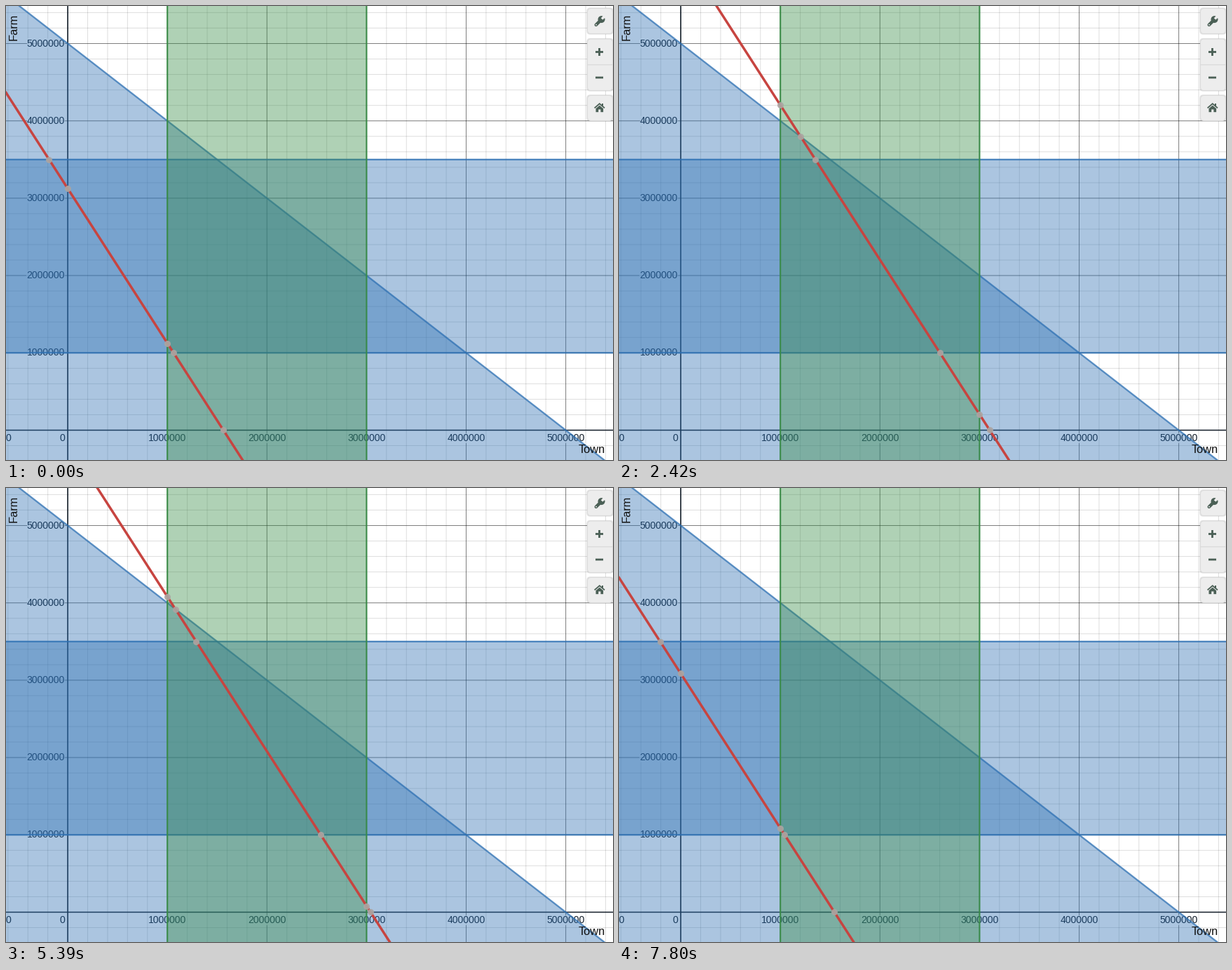
A matplotlib script that plays this animation: 866x647 px, repeating every 7880 ms.

```python
import numpy as np
import matplotlib
import matplotlib.pyplot as plt
from matplotlib.animation import FuncAnimation
from matplotlib.collections import LineCollection
from matplotlib.patches import Circle, FancyBboxPatch, Polygon, Rectangle

matplotlib.rcParams["toolbar"] = "None"

W, H, DPI = 866, 647, 72          # at 72 dpi one point is one pixel
X0, Y0 = 88.1, 604.5              # origin in pixels
SX, SY = 142.1, 110.2             # pixels per million
LOOP, TICK = 7880, 20
FIRST, STEP = 70, 78              # redraw times of the moving line, ms

BLUE, GREEN, RED = "#2d70b3", "#388c46", "#c74440"
INK, ICON, PANEL = "#101a26", "#4b6056", "#ededed"
FONT = "Liberation Sans"


def px(x):
    return X0 + SX * x


def py(y):
    return Y0 - SY * y


fig = plt.figure(figsize=((W + 0.01) / DPI, (H + 0.01) / DPI), dpi=DPI, facecolor="white")
ax = fig.add_axes([0, 0, 1, 1])
ax.set_xlim(0, W)
ax.set_ylim(H, 0)
ax.axis("off")


def grid(step, alpha, z):
    marks = np.arange(-5, 40) * step
    lines = [[(px(m), 0), (px(m), H)] for m in marks] + [[(0, py(m)), (W, py(m))] for m in marks]
    ax.add_collection(LineCollection(lines, colors=[(0, 0, 0, alpha)], linewidths=1,
                                     zorder=z, snap=False))


def rule(xs, ys, color, width, z, alpha=1.0, cap="butt"):
    return ax.plot(xs, ys, color=color, lw=width, alpha=alpha, zorder=z, snap=False,
                   solid_capstyle=cap, solid_joinstyle="miter")[0]


def label(x, y, text, ha):
    ax.text(x, y, text, ha=ha, va="center", family=FONT, size=14, color=INK, zorder=3,
            bbox=dict(fc="white", ec="none", alpha=0.75, pad=0))


def title(x, y, text, angle=0):
    ax.text(x, y, text, rotation=angle, ha="center", va="center", family=FONT,
            size=16.4, color="#111111", zorder=7)


def fill(points, color, z, alpha=1.0):
    ax.add_patch(Polygon(points, fc=color, ec="none", alpha=alpha, zorder=z, snap=False))


def shade(points, color, z):
    fill(points, color, z, 0.4)


def rect(x0, y0, x1, y1):
    return [(x0, y0), (x1, y0), (x1, y1), (x0, y1)]


# graph paper
grid(0.2, 0.13, 1)
grid(1, 0.42, 1.1)
rule([px(0)] * 2, [0, H], INK, 1.5, 2)
rule([0, W], [py(0)] * 2, INK, 1.5, 2)
for n in range(1, 6):
    label(px(n), 616, f"{n}000000", "center")
    label(83.8, py(n), f"{n}000000", "right")
for x in (7.5, 83.8):
    label(x, 616, "0", "right")

# constraint regions
shade(rect(0, py(3.5), W, py(1)), BLUE, 4)
for y in (1, 3.5):
    rule([0, W], [py(y)] * 2, BLUE, 2.2, 4.1, 0.85)
shade([(px(-1), py(6)), (px(6), py(-1)), (px(-1), py(-1))], BLUE, 5)
rule([px(-1), px(6)], [py(6), py(-1)], BLUE, 2.3, 5.1, 0.75)
shade(rect(px(1), 0, px(3), H), GREEN, 6)
for x in (1, 3):
    rule([px(x)] * 2, [0, H], GREEN, 2.2, 6.1, 0.9)

title(11.6, 29.5, "Farm", 90)
title(836.2, 632, "Town")


# side buttons
def panel(y0, y1):
    for grow, color, alpha in ((1.2, "#000000", 0.1), (0, PANEL, 1)):
        ax.add_patch(FancyBboxPatch(
            (829.5 - grow, y0 - grow), 36 + 2 * grow, y1 - y0 + 2 * grow,
            boxstyle="round,pad=0,rounding_size=5", fc=color,
            ec="none" if grow else "#dadada", lw=1, alpha=alpha, zorder=10))


def wrench(x, y):
    rule([x - 5, x + 2], [y + 5.5, y - 1.5], ICON, 4.6, 12, cap="round")
    ax.add_patch(Circle((x + 2.7, y - 2.3), 5, fc=ICON, ec="none", zorder=12))
    fill([(x + 2, y - 4), (x + 6.7, y - 9.4), (x + 9.7, y - 6.4), (x + 4.5, y - 1.8)], PANEL, 13)
    ax.add_patch(Circle((x - 4.8, y + 5.3), 0.9, fc=PANEL, ec="none", zorder=13))


def house(x, y):
    rule([x - 7.2, x, x + 7.2], [y, y - 6.2, y], ICON, 1.8, 12)
    half = [(5.3, 0.8), (5.3, 5.8), (1.6, 5.8), (1.6, 2)]
    fill([(x, y - 3.7)] + [(x + a, y + b) for a, b in half]
         + [(x - a, y + b) for a, b in half[::-1]], ICON, 12)
    ax.add_patch(Rectangle((x + 3.6, y - 6.4), 2, 4, fc=ICON, ec="none", zorder=12))


for top, bottom in ((3.5, 39.5), (47, 120.5), (127.5, 163.5)):
    panel(top, bottom)
rule([829.5, 865.5], [83.8] * 2, "#d6d6d6", 1, 11)
wrench(846.8, 21.4)
for y in (65.5, 102):
    rule([841, 852], [y] * 2, ICON, 2.8, 12)
rule([846.5] * 2, [60, 71], ICON, 2.8, 12)
house(846.8, 145.4)

# moving objective line 2x + y = c, swept up and back at a steady pace
red = rule([], [], RED, 3.5, 8)
dots, = ax.plot([], [], "o", ms=9, mfc="#aba5a2", mec="none", alpha=0.92, zorder=9)


def level(t):
    return np.interp(t, [0, 1640, 3860, 5390, 7800], [3.125, 5.25, 8, 6.06, 3.076])


def draw(i):
    t = i * TICK + TICK / 2
    c = level(max(0, FIRST + (t - FIRST) // STEP * STEP))
    ys = np.array([6.5, -1.5])
    red.set_data(px((c - ys) / 2), py(ys))
    hits = np.array([(c / 2, 0), (0, c), ((c - 1) / 2, 1), ((c - 3.5) / 2, 3.5),
                     (1, c - 2), (3, c - 6), (c - 5, 10 - c)])
    dots.set_data(px(hits[:, 0]), py(hits[:, 1]))
    return red, dots


anim = FuncAnimation(fig, draw, frames=LOOP // TICK, init_func=lambda: draw(0),
                     interval=TICK, repeat=True, repeat_delay=0, blit=False)
plt.show()
```
